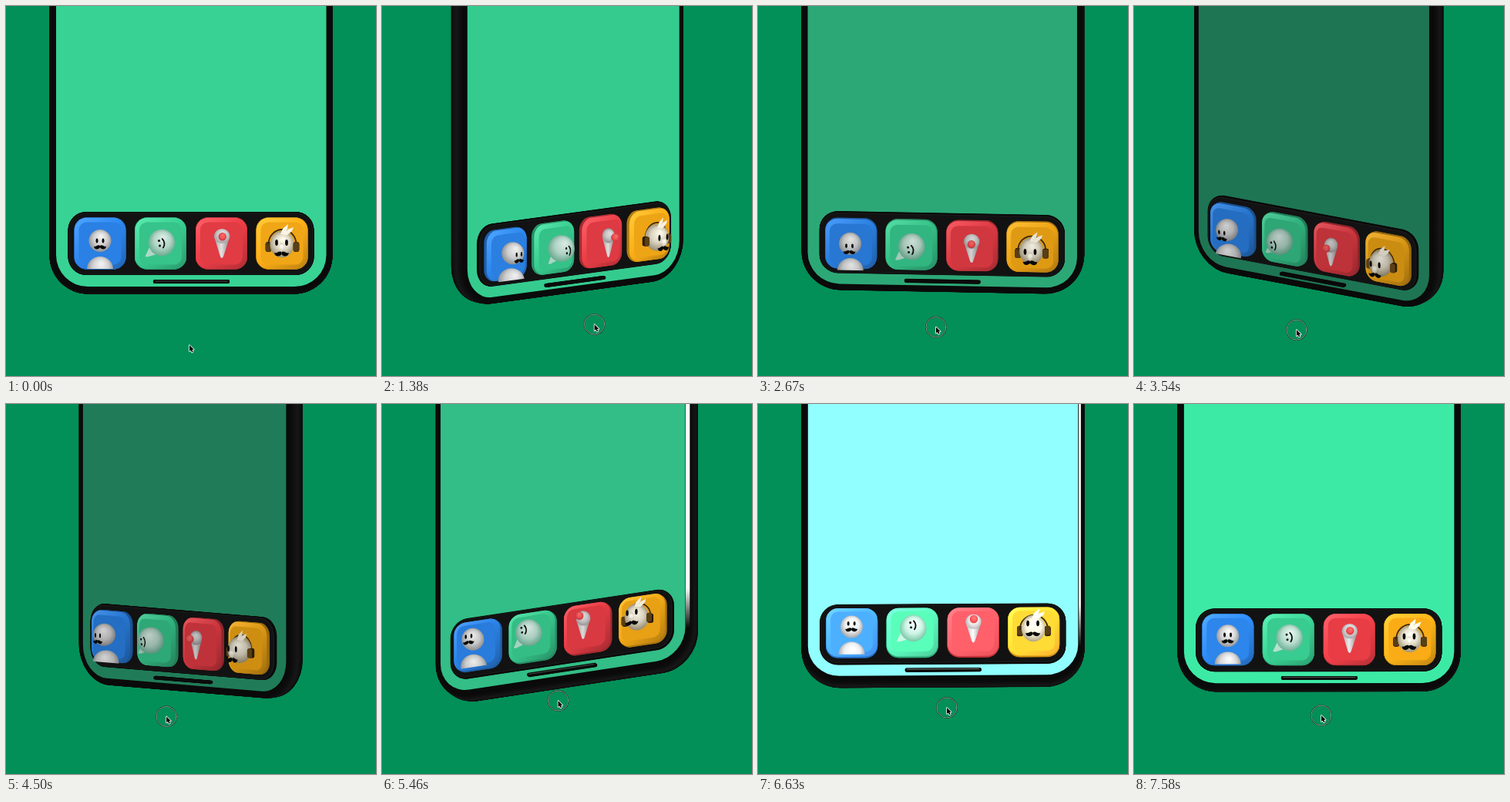
Animation of 480x480 px, one loop 7620 ms. Source, as an HTML page with a canvas:

```html
<!DOCTYPE html>
<html>
<head>
<meta charset="utf-8">
<style>
html, body { margin: 0; width: 100%; height: 100%; overflow: hidden; background: #029058; }
canvas { display: block; }
</style>
</head>
<body>
<canvas id="stage" width="480" height="480"></canvas>
<script>
const g = document.getElementById('stage').getContext('2d');
const LOOP = 7620, CX = 240, CY = 215, LAG = 250;

// Pointer path: time, x, y
const PATH = [
  [0, 238, 440], [600, 262, 415], [1250, 278, 413], [2670, 231, 416.5],
  [3400, 213, 421], [4250, 206, 410], [5200, 220.5, 391], [5460, 228.5, 385],
  [6630, 245, 394], [7330, 243, 404], [LOOP, 243, 404]
];

const clamp = v => Math.max(0, Math.min(1, v));
const ease = v => v * v * (3 - 2 * v);
const rgb = (c, m = 1, add = 0) =>
  `rgb(${c.map(v => Math.min(255, Math.round(v * m + add)))})`;

function slope(i, j) {
  if (i < 1 || i >= PATH.length - 1) return 0;
  return (PATH[i + 1][j] - PATH[i - 1][j]) / (PATH[i + 1][0] - PATH[i - 1][0]);
}

// Smooth cubic through the path points
function pointerAt(t) {
  t = Math.max(0, t);
  let i = 0;
  while (t >= PATH[i + 1][0]) i++;
  const a = PATH[i], b = PATH[i + 1], d = b[0] - a[0], u = (t - a[0]) / d, h = ease(u);
  return [1, 2].map(j => a[j] * (1 - h) + b[j] * h +
    d * (u * (1 - u) ** 2 * slope(i, j) - u * u * (1 - u) * slope(i + 1, j)));
}

let sy, cy, sp, cp, light, tone, flare;

// The phone leans after the pointer; its light follows the surface normal
function pose(t) {
  const [x, y] = pointerAt(t - LAG), hover = ease(clamp(t / 750));
  const yaw = hover * (x - 243.5) * 1.1 * Math.PI / 180;
  sy = Math.sin(yaw);
  cy = Math.cos(yaw);
  sp = hover * .36 * Math.tanh((y - 407) / 11);
  cp = Math.sqrt(1 - sp * sp);
  const nx = sy, ny = sp * cy, nz = cy * cp;
  const gloss = Math.exp(-24 * (nx * nx + (ny + .33) ** 2));
  light = 65 * nx - 110 * ny + 205 * nz + 50 * nx * nx + 75 * gloss;
  flare = clamp((light - 235) / 65);
  tone = 1 + (light - 210) / 600;
}

function layer(z) {
  g.setTransform(cy, -sp * sy, 0, cp, CX + z * sy, CY + sp * z * cy);
  g.translate(-CX, -CY);
}

function project(x, y, z) {
  x -= CX;
  y -= CY;
  return [CX + x * cy + z * sy, CY + y * cp + sp * (z * cy - x * sy)];
}

function box(x0, y0, x1, y1, r, fill) {
  g.beginPath();
  g.roundRect(x0, y0, x1 - x0, y1 - y0, r);
  g.fillStyle = fill;
  g.fill();
}

function oval(x, y, rx, ry, fill = '#080808') {
  g.beginPath();
  g.ellipse(x, y, rx, ry, 0, 0, 7);
  g.fillStyle = fill;
  g.fill();
}

function line(width, color, draw) {
  g.beginPath();
  draw();
  g.lineWidth = width;
  g.strokeStyle = color;
  g.lineCap = 'round';
  g.stroke();
}

function shape(fill, points) {
  g.beginPath();
  points.forEach(p => g.lineTo(...p));
  g.closePath();
  g.fillStyle = fill;
  g.fill();
}

function ball(x, y, z, r, bright, dark, ry = r) {
  const [px, py] = project(x, y, z);
  g.resetTransform();
  const f = g.createRadialGradient(px + r * (.1 + sy * .3), py - r * .4, r * .1, px, py, r * 1.15);
  f.addColorStop(0, rgb(bright, tone));
  f.addColorStop(.5, rgb(bright.map((v, i) => v * .7 + dark[i] * .3), tone));
  f.addColorStop(1, rgb(dark, tone));
  oval(px, py, r, ry, f);
}

function mustache(x, y, w) {
  g.fillStyle = '#080808';
  for (const s of [-w, w]) {
    g.beginPath();
    g.moveTo(x, y - w * .16);
    g.bezierCurveTo(x + s * .3, y - w * .5, x + s * .65, y + w * .1, x + s, y - w * .1);
    g.bezierCurveTo(x + s * .9, y + w * .5, x + s * .3, y + w * .5, x, y + w * .1);
    g.fill();
  }
}

function phone() {
  for (let z = -13; z <= 14; z++) {
    layer(z);
    const n = Math.abs((z - .5) / 13.5) ** 4 * 2.2, v = 24 - Math.abs(z);
    box(56.5 + n, -500, 423.5 - n, 373.5 - n, 50, rgb([v, v, v]));
  }
  const shine = clamp((-sp - .1) * 5);
  if (shine) {
    layer(14);
    const f = g.createLinearGradient(0, 270, 0, 325);
    f.addColorStop(0, `rgba(255,255,255,${shine})`);
    f.addColorStop(1, 'rgba(255,255,255,0)');
    const w = 2.5 + 8 * Math.max(0, -sy), x = 416.5 + w / 2;
    line(w, f, () => {
      g.moveTo(x, -500);
      g.lineTo(x, 325);
    });
  }
  layer(13);
  box(65, -500, 415.5, 364, 41,
    rgb([.26 * light + 66 * flare, light, .705 * light + 45 * flare]));
}

function dock() {
  for (let z = 13; z <= 18; z++) {
    layer(z);
    const n = Math.max(0, z - 16), v = 10 + (n ? 24 - n * 8 : 0);
    box(80.5 + n, 267 + n, 399.5 - n, 349 - n, 24 - n, rgb([v, v, v]));
  }
  for (let z = 14; z <= 18; z++) {
    layer(z);
    box(191, 355.3, 290, 359.7, 2.2, '#0a0a0a');
  }
  line(.8, `rgba(190,205,200,${clamp(.5 - sp * 2) * .75 * cy ** 6})`, () => {
    g.moveTo(194, 357);
    g.lineTo(287, 357);
  });
}

function tile(x, color) {
  const y = 308, r = 33.5, add = flare * 28;
  for (let z = 18; z <= 26; z++) {
    layer(z);
    const n = Math.max(0, z - 22) ** 2 * .36;
    let fill = rgb(color, tone * .74);
    if (n) {
      fill = g.createLinearGradient(x - r, y - r, x + r * .7, y + r);
      fill.addColorStop(0, rgb(color, tone, add + 36));
      fill.addColorStop(.5, rgb(color, tone * 1.04, add));
      fill.addColorStop(1, rgb(color, tone * (.56 + z * .01), add));
    }
    box(x - r + n, y - r + n, x + r - n, y + r - n, 16 - n, fill);
  }
  box(x - 27.5, y - 27.5, x + 27.5, y + 27.5, 10, rgb(color, tone * .98, add));
}

const WHITE = [240, 240, 240], GREY = [128, 130, 133], CREAM = [255, 250, 235], TAN = [150, 138, 110];

function person() {
  tile(122, [43, 131, 232]);
  g.save();
  layer(32);
  g.beginPath();
  g.rect(80, 300, 90, 41);
  g.clip();
  ball(122, 341, 33, 17, WHITE, GREY, 16);
  g.restore();
  ball(122, 304.5, 36, 14.5, WHITE, GREY);
  layer(49);
  oval(118, 304.5, 1.5, 3);
  oval(126, 304.5, 1.5, 3);
  mustache(122, 312.5, 8);
}

function bubble() {
  tile(200.5, [55, 200, 141]);
  layer(36);
  shape(rgb([175, 215, 198], tone), [[186, 313], [180.5, 325], [184, 325.5], [195, 322]]);
  ball(202, 307, 36, 17.3, [215, 235, 227], [88, 160, 131]);
  layer(51);
  oval(198.5, 304.5, 1.5, 1.5);
  oval(199.5, 311, 1.5, 1.5);
  line(1.8, '#080808', () => g.arc(196.5, 308.5, 9, -.8, .6));
}

function pin() {
  tile(279.5, [229, 60, 69]);
  layer(36);
  const f = g.createLinearGradient(270, 0, 291, 0);
  f.addColorStop(0, rgb([165, 160, 160], tone));
  f.addColorStop(.45, rgb([228, 225, 225], tone));
  f.addColorStop(1, rgb([130, 125, 126], tone));
  g.beginPath();
  g.moveTo(270, 299);
  g.lineTo(278, 325);
  g.quadraticCurveTo(280, 329, 282, 325);
  g.lineTo(290.5, 299);
  g.fillStyle = f;
  g.fill();
  ball(280.2, 298.5, 36, 10.2 * cy, [226, 223, 223], [150, 146, 147], 9.6);
  ball(280.8, 299.3, 49, 5.2, [255, 105, 105], [200, 40, 45]);
}

function cup(x) {
  for (let z = 35; z <= 41; z++) {
    layer(z);
    box(x - 3.6, 306.5, x + 3.6, 318.5, 2, z > 39 ? '#5a3f14' : '#2b1d09');
  }
}

function listener() {
  tile(358, [245, 169, 22]);
  const far = sy > 0 ? 376.5 : 340.5;
  cup(far);
  layer(36);
  line(1.8, '#3b290a', () => g.ellipse(358.5, 309, 18, 19, 0, Math.PI, 0));
  ball(358, 309, 39, 15.5, CREAM, TAN, 17.3);
  layer(42);
  const hair = rgb([250, 244, 228], tone);
  shape(hair, [[356, 296], [359, 289], [366, 283], [365, 289], [362, 296]]);
  shape(hair, [[360, 297], [365, 290], [373, 287], [371, 292], [365, 297]]);
  cup(717 - far);
  layer(53);
  oval(351, 307, 1.9, 4);
  oval(364, 307, 1.9, 4);
  mustache(357.5, 321, 9.5);
  ball(357.5, 312.5, 54, 3.4, [255, 253, 245], [222, 214, 193], 5.5);
}

function pointer(x, y, ring) {
  g.resetTransform();
  if (ring) {
    const circle = () => g.arc(x, y, 13, 0, 7);
    line(1.8, 'rgba(10,35,25,.85)', circle);
    line(.7, 'rgba(230,245,238,.8)', circle);
  }
  const arrow = [[0, 0], [0, 8], [1.8, 6.4], [3.2, 9.3], [4.6, 8.6], [3.4, 5.8], [5.8, 5.8]];
  shape('#000', arrow.map(([a, b]) => [x + a, y + b]));
  g.lineWidth = 1.6;
  g.lineJoin = 'round';
  g.strokeStyle = '#fff';
  g.stroke();
  g.fill();
}

function draw(t) {
  pose(t);
  g.resetTransform();
  g.fillStyle = '#029058';
  g.fillRect(0, 0, 480, 480);
  phone();
  dock();
  person();
  bubble();
  pin();
  listener();
  pointer(...pointerAt(t), t > 200);
}

const start = performance.now();
function tick() {
  draw((performance.now() - start) % LOOP);
  requestAnimationFrame(tick);
}
tick();
</script>
</body>
</html>
```
